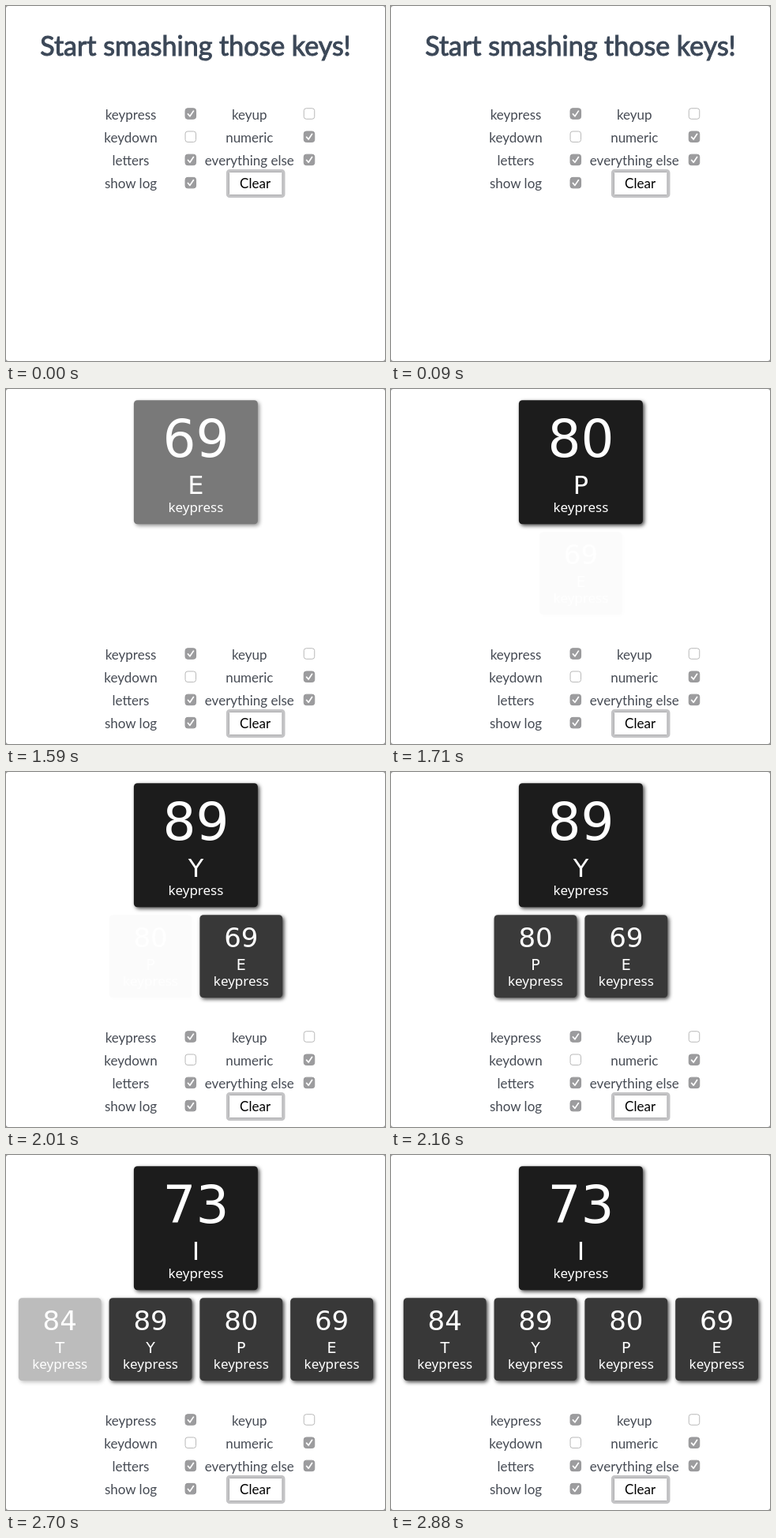
Recreate the animation shown at these times as an HTML page. Size 480 px wide and 450 px high, loop 4.35 s.

```html
<!DOCTYPE html>
<html lang="en">
<head>
<meta charset="utf-8">
<title>Start smashing those keys!</title>
<style>
  html, body { margin: 0; width: 100%; height: 100%; overflow: hidden; background: #8b8b8b; }
  svg { display: block; width: 480px; height: 450px; }
  text { text-anchor: middle; font: 17px Lato, sans-serif; fill: #464b54; }
  .title { font-size: 34px; fill: #3c4858; stroke: #3c4858; stroke-width: 1; }
  .clear { fill: #000; }
  .card { filter: drop-shadow(2px 2px 2.5px rgba(0, 0, 0, .75)); }
  .card text { fill: #fff; }
  .card .code, .card .key { font-family: "DejaVu Sans", sans-serif; }
  .card .type { font-family: "Noto Sans", sans-serif; }
  .big .code { font-size: 66px; }
  .big .key { font-size: 32px; }
  .small .code { font-size: 34px; }
  .small .key { font-size: 19px; }
</style>
</head>
<body>
<svg viewBox="0 0 480 450">
  <rect width="480" height="450" rx="3" fill="#fff"/>
  <text id="title" class="title" x="240" y="62.5">Start smashing those keys!</text>
  <g id="cards"></g>
  <g id="controls"></g>
</svg>
<script>
const LOOP = 4350, FADE = 170, MID = 240.4, PITCH = 114.8, SHIFT = 199;
const presses = [
  { at: 1530, key: "E" },
  { at: 1710, key: "P" },
  { at: 2010, key: "Y" },
  { at: 2220, key: "T" },
  { at: 2670, key: "I" }
];
const $ = id => document.getElementById(id);

function add(parent, tag, attrs, content) {
  const node = document.createElementNS("http://www.w3.org/2000/svg", tag);
  for (const name in attrs) node.setAttribute(name, attrs[name]);
  if (content) node.textContent = content;
  parent.appendChild(node);
  return node;
}

function checkbox(parent, x, y, on) {
  add(parent, "rect", {
    x: x - 6.75, y: y - 6.75, width: 13.5, height: 13.5, rx: 3,
    fill: on ? "#9c9c9e" : "#fff", stroke: on ? "#969698" : "#b9b9b9"
  });
  if (on) add(parent, "path", {
    d: `M${x - 3.4} ${y + .4}l2.5 2.9 4.5 -6.7`, fill: "none", stroke: "#fff",
    "stroke-width": 1.7, "stroke-linecap": "round", "stroke-linejoin": "round"
  });
}

function buildControls() {
  const g = $("controls");
  const options = [
    ["keypress", true], ["keyup", false],
    ["keydown", false], ["numeric", true],
    ["letters", true], ["everything else", true],
    ["show log", true]
  ];
  options.forEach(([label, on], i) => {
    const right = i % 2, row = Math.floor(i / 2);
    add(g, "text", { x: right ? 308.3 : 158, y: 143.5 + row * 29.1 }, label);
    checkbox(g, right ? 384 : 233.8, 136.5 + row * 29.2, on);
  });
  add(g, "rect", { x: 280.7, y: 208.7, width: 71, height: 32.6, rx: 2.5,
    fill: "#fff", stroke: "#c4c4c6", "stroke-width": 3.6 });
  add(g, "rect", { x: 282.5, y: 210.5, width: 67.4, height: 29, rx: 1,
    fill: "#fff", stroke: "#adadaf", "stroke-width": 1 });
  add(g, "text", { class: "clear", x: 315.6, y: 231.2 }, "Clear");
}

function buildCard(key, big) {
  const size = big ? 157 : 104.8, top = big ? 14.3 : 181.2;
  const [codeY, keyY, typeY] = big ? [85.5, 133, 156] : [221.5, 250.8, 270.8];
  const g = add($("cards"), "g", { class: "card " + (big ? "big" : "small") });
  add(g, "rect", { x: -size / 2, y: top, width: size, height: size, rx: 4.5,
    fill: big ? "#1c1c1c" : "#383838" });
  add(g, "text", { class: "code", y: codeY }, String(key.charCodeAt(0)));
  add(g, "text", { class: "key", y: keyY }, key);
  add(g, "text", { class: "type", y: typeY }, "keypress");
  return g;
}

function place(node, visible, x, opacity) {
  node.setAttribute("visibility", visible ? "visible" : "hidden");
  node.setAttribute("transform", `translate(${x} 0)`);
  node.setAttribute("opacity", opacity);
}

function fade(t) {
  const p = Math.min(1, Math.max(0, t / FADE));
  return 1 - (1 - p) ** 2;
}

function render(t) {
  const last = presses.filter(p => t >= p.at).length - 1;
  const started = last >= 0;
  $("title").setAttribute("visibility", started ? "hidden" : "visible");
  $("controls").setAttribute("transform", `translate(0 ${started ? SHIFT : 0})`);
  presses.forEach((p, i) => {
    place(p.big, i === last, MID, i ? 1 : fade(t - p.at));
    // The newest logged key sits leftmost in a centred row.
    const x = MID + (last - 1 - i - (last - 1) / 2) * PITCH;
    const next = presses[i + 1];
    place(p.small, i < last, x, next ? fade(t - next.at) : 0);
  });
}

buildControls();
for (const p of presses) {
  p.big = buildCard(p.key, true);
  p.small = buildCard(p.key, false);
}

const start = performance.now();
function tick() {
  render((performance.now() - start) % LOOP);
  requestAnimationFrame(tick);
}
render(0);
requestAnimationFrame(tick);
</script>
</body>
</html>
```
